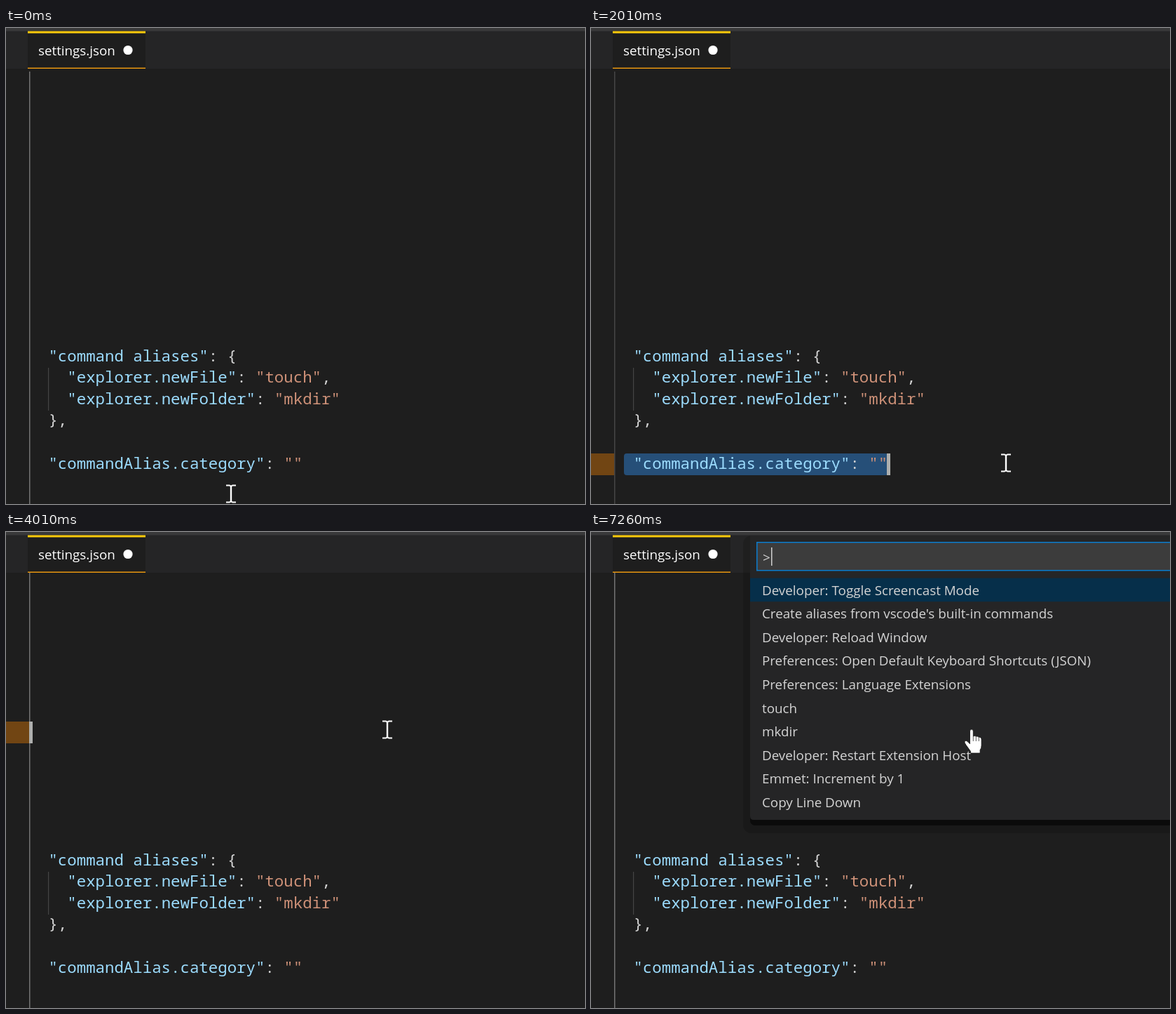
Write an HTML page that moves like this. It is 826 px wide and 678 px high and loops after 8000 ms.

```html
<!DOCTYPE html>
<html lang="en">
<head>
<meta charset="utf-8">
<title>Command aliases</title>
<style>
  html, body { margin: 0; width: 100%; height: 100%; overflow: hidden; background: #1e1e1e; }
  svg { display: block; width: 826px; height: 678px; }
  text { white-space: pre; }

  .code { font: 22.4px "Noto Sans Mono", monospace; fill: #d4d4d4; }
  .key { fill: #9cdcfe; }
  .str { fill: #ce9178; }
  .ui { font: 18.8px "Open Sans", sans-serif; fill: #d4d4d4; }
  .white { fill: #fff; }
  .match { fill: #0097fb; font-weight: 700; font-size: 18.4px; }

  /* Everything changes in hard steps on one shared 8 s clock. */
  .anim { animation: 8s step-end infinite; }
  #guide { animation-name: guide; }
  #line { animation-name: line; }
  #selection { animation-name: selection; }
  #caret { animation-name: caret; }
  #pointer { animation-name: pointer; }
  #click { animation-name: click; }
  #search { animation-name: search; }
  #list, #hand { animation-name: list; }

  @keyframes guide {
    0% { fill: #747474; height: 616px; y: 62px; }
    18.75% { fill: #464646; height: 616px; y: 62px; }
    47% { fill: #747474; height: 620px; y: 58px; }
  }
  @keyframes line {
    0% { opacity: 0; transform: translateY(606px); }
    15.625% { opacity: 1; transform: translateY(606px); }
    47% { opacity: 1; transform: translateY(270px); }
    68.875% { opacity: 0; transform: translateY(270px); }
  }
  @keyframes selection {
    0% { opacity: 0; width: 241px; }
    18.75% { opacity: 1; width: 241px; }
    21.875% { opacity: 1; width: 377px; }
    47% { opacity: 0; width: 377px; }
  }
  @keyframes caret {
    0% { opacity: 0; transform: translate(287px, 606px); }
    18.75% { opacity: 1; transform: translate(287px, 606px); }
    21.875% { opacity: 1; transform: translate(422px, 606px); }
    28% { opacity: 0; transform: translate(422px, 606px); }
    34.5% { opacity: 1; transform: translate(422px, 606px); }
    40.5% { opacity: 0; transform: translate(422px, 606px); }
    47% { opacity: 1; transform: translate(33px, 270px); }
    53.25% { opacity: 0; transform: translate(33px, 270px); }
    59.5% { opacity: 1; transform: translate(33px, 270px); }
    66% { opacity: 0; transform: translate(33px, 270px); }
  }
  @keyframes pointer {
    0% { opacity: 1; transform: translate(321px, 664px); }
    3.125% { opacity: 1; transform: translate(147px, 640px); }
    6.25% { opacity: 1; transform: translate(88px, 628px); }
    9.625% { opacity: 1; transform: translate(49px, 620px); }
    12.75% { opacity: 1; transform: translate(47px, 620px); }
    18.75% { opacity: 1; transform: translate(482px, 620px); }
    21.875% { opacity: 1; transform: translate(592px, 620px); }
    31.125% { opacity: 1; transform: translate(574px, 668px); }
    34.5% { opacity: 1; transform: translate(565px, 670px); }
    37.375% { opacity: 1; transform: translate(545px, 475px); }
    43.875% { opacity: 1; transform: translate(545px, 283px); }
    50.125% { opacity: 1; transform: translate(544px, 282px); }
    90.75% { opacity: 0; transform: translate(544px, 282px); }
  }
  @keyframes click {
    0% { opacity: 0; transform: translate(47px, 620px); }
    15.625% { opacity: 1; transform: translate(47px, 620px); }
    18.75% { opacity: 1; transform: translate(481px, 620px); }
    21.875% { opacity: 1; transform: translate(591px, 620px); }
    25.125% { opacity: 0; transform: translate(591px, 620px); }
  }
  @keyframes search {
    0% { opacity: 0; }
    68.875% { opacity: 1; }
    90.75% { opacity: 0; }
  }
  @keyframes list {
    0% { opacity: 0; }
    90.75% { opacity: 1; }
  }
</style>
</head>
<body>
<svg viewBox="0 0 826 678">
  <defs>
    <linearGradient id="ring" x1="0" y1="0" x2="0" y2="1">
      <stop offset="0" stop-color="#ff9800"/>
      <stop offset=".5" stop-color="#ff6000"/>
      <stop offset="1" stop-color="#f80000"/>
    </linearGradient>
    <g id="input">
      <rect x="236.75" y="14.75" width="620" height="40" fill="#3c3c3c" stroke="#0a7ccd" stroke-width="1.5"/>
      <rect x="227" y="65.7" width="599" height="33.5" fill="#062f4a"/>
      <text class="ui" x="245" y="43">&gt;</text>
    </g>
  </defs>

  <rect width="826" height="678" fill="#1e1e1e"/>
  <rect width="826" height="58" fill="#252526"/>
  <rect width="826" height="4.5" fill="#39393a"/>
  <rect x="31" y="4.5" width="168" height="53.5" fill="#1e1e1e"/>
  <rect x="31" y="4.5" width="168" height="3" fill="#fbcb0b"/>
  <rect x="31" y="56.5" width="168" height="1.5" fill="#e8960f"/>
  <text class="ui white" x="46" y="39">settings.json</text>
  <circle cx="174" cy="31.5" r="6.6" fill="#fff"/>

  <rect id="line" class="anim" width="33" height="31" fill="#714513"/>
  <rect id="guide" class="anim" x="33" width="1.5"/>
  <rect x="60" y="484" width="1.2" height="61" fill="#444"/>
  <rect id="selection" class="anim" x="47" y="606" height="31" rx="4" fill="#264f78"/>

  <g class="code">
    <text x="60.4" y="474.6"><tspan class="key">"command aliases"</tspan>: {</text>
    <text x="87.3" y="505.2"><tspan class="key">"explorer.newFile"</tspan>: <tspan class="str">"touch"</tspan>,</text>
    <text x="87.3" y="535.8"><tspan class="key">"explorer.newFolder"</tspan>: <tspan class="str">"mkdir"</tspan></text>
    <text x="60.4" y="566.3">},</text>
    <text x="60.4" y="627.5"><tspan class="key">"commandAlias.category"</tspan>: <tspan class="str">""</tspan></text>
  </g>
  <rect id="caret" class="anim" width="5" height="31" fill="#aeafad"/>

  <g id="search" class="anim">
    <rect x="222" y="5" width="620" height="114" rx="9" opacity=".25"/>
    <rect x="227" y="60" width="620" height="54" rx="6" fill="#0d0d0d"/>
    <path d="M227 5H826V108H232q-5 0-5-5z" fill="#252526"/>
    <use href="#input"/>
    <rect x="257.7" y="21.5" width="91" height="26.700" fill="#0d67d8"/>
    <text class="ui white" x="257.5" y="43" style="font-size:18.5px">screencast</text>
    <text class="ui" x="244" y="89.5">Developer: Toggle <tspan class="match" x="406.5">Screencast</tspan><tspan x="511.5">Mode</tspan></text>
  </g>

  <g id="list" class="anim">
    <rect x="217" y="5" width="620" height="424" rx="12" opacity=".16"/>
    <rect x="227" y="360" width="620" height="58" rx="7" fill="#0b0b0b"/>
    <path d="M227 5H826V410H232q-5 0-5-5z" fill="#252526"/>
    <use href="#input"/>
    <rect x="257" y="22" width="1.5" height="26" fill="#d0d0d0"/>
    <g class="ui">
      <text x="244" y="89.5">Developer: Toggle Screencast Mode</text>
      <text x="244" y="123.1">Create aliases from vscode's built-in commands</text>
      <text x="244" y="156.7">Developer: Reload Window</text>
      <text x="244" y="190.3">Preferences: Open Default Keyboard Shortcuts (JSON)</text>
      <text x="244" y="223.9">Preferences: Language Extensions</text>
      <text x="244" y="257.5">touch</text>
      <text x="244" y="291.1">mkdir</text>
      <text x="244" y="324.7">Developer: Restart Extension Host</text>
      <text x="244" y="358.3">Emmet: Increment by 1</text>
      <text x="244" y="391.9">Copy Line Down</text>
    </g>
  </g>

  <path id="pointer" class="anim" fill="#fff"
    d="M-7-13.500h5l2 1 2-1h5v2h-5l-.8 1v20l.8 1h5v2H2l-2-1-2 1h-5v-2h5l.8-1v-20l-.8-1h-5z"/>
  <g id="hand" class="anim">
    <path fill="#fff" stroke="#111" stroke-width=".8" stroke-linejoin="round"
      d="M540.5 284q0-3 2.4-3t2.4 3v7q2-1.5 4 .3 2-1 3.8 1 4-.6 4 3.700v8q0 4-2 6.500v4.500h-13.500v-2.500l-6.500-9q-3-4-2-5.500 2-2 4.500.8l2.900 3z"/>
    <path d="M545.3 291v7M549.3 292v6M553.3 293v5" stroke="#333" stroke-width=".8"/>
  </g>
  <circle id="click" class="anim" r="17.8" fill="#fff000" fill-opacity=".48" stroke="url(#ring)" stroke-width="2.6"/>
</svg>
</body>
</html>
```
